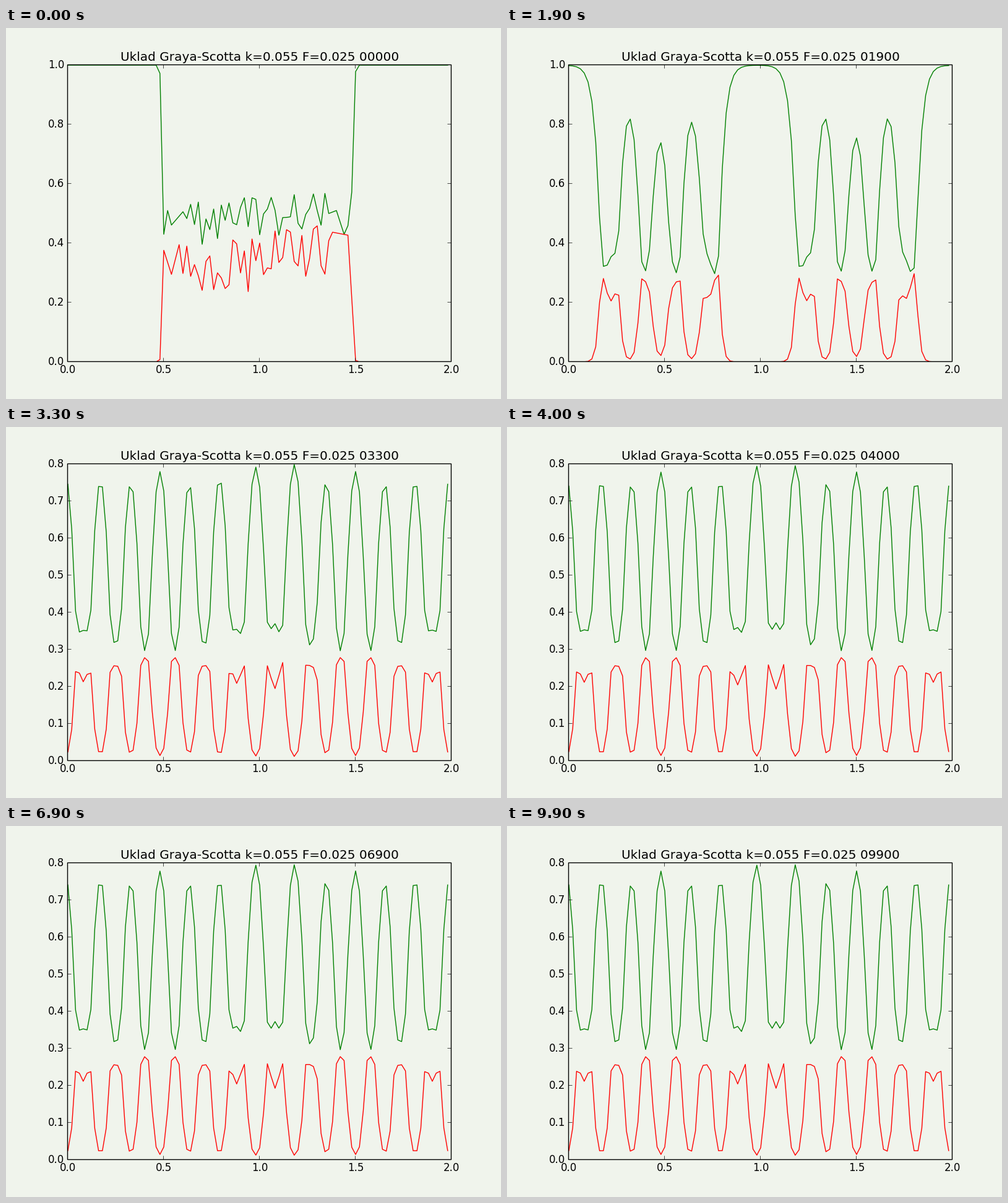
A matplotlib script for the animation above (10000 ms loop, 800x600 px).

```python
import numpy as np
import matplotlib.pyplot as plt
from matplotlib.animation import FuncAnimation
from matplotlib.collections import LineCollection
from matplotlib.patches import Rectangle
from matplotlib.transforms import ScaledTranslation

F, K = 0.025, 0.055
DU, DV = 2e-5, 1e-5
N, DX = 100, 0.02
FRAMES, STEPS = 100, 100
BG = "#f0f4ec"

# Key points (cell, value) of the starting block; noise fills its inside.
U_KEYS = [(23, 1), (24, .972), (25, .43), (26, .51), (27, .461), (30, .506),
          (32, .46), (68, .5), (70, .51), (72, .43), (73, .459), (74, .572),
          (75, .978), (76, 1)]
V_KEYS = [(23, 0), (24, .008), (25, .376), (27, .295), (29, .395), (30, .298),
          (31, .39), (32, .29), (67, .38), (69, .437), (73, .427), (74, .215),
          (75, .005), (76, 0)]


def laplacian(a):
    return (np.roll(a, 1) + np.roll(a, -1) - 2 * a) / DX**2


def start():
    cells = np.arange(N)
    u, v = (np.interp(cells, *zip(*keys)) for keys in (U_KEYS, V_KEYS))
    rng = np.random.default_rng(4)
    u[32:68] += rng.uniform(-0.08, 0.08, 36)
    v[32:68] += rng.uniform(-0.1, 0.1, 36)
    return u, v


def simulate():
    u, v = start()
    states = []
    for _ in range(FRAMES):
        states.append((u, v))
        for _ in range(STEPS):
            # v reacts with the already updated u
            u = u + DU * laplacian(u) - u * v**2 + F * (1 - u)
            v = v + DV * laplacian(v) + u * v**2 - (F + K) * v
    return states


states = simulate()
x = np.arange(N) * DX

plt.rcParams.update({"font.family": "DejaVu Sans", "font.size": 12,
                     "ytick.alignment": "center", "text.kerning_factor": 6})
fig = plt.figure(figsize=(8, 6), dpi=100, facecolor=BG)
ax = fig.add_axes([0.125, 0.1, 0.775, 0.8], facecolor=BG)
ax.set_xlim(0, 2)
xticks = np.linspace(0, 2, 5)
ax.set_xticks(xticks, [f"{t:.1f}" for t in xticks])
ax.tick_params(axis="x", length=0, pad=3)
ax.tick_params(axis="y", length=0, pad=4)
ax.spines[:].set_visible(False)

u_line, = ax.plot([], [], color="#008000", lw=1)
v_line, = ax.plot([], [], color="#ff0000", lw=1)
title = ax.set_title("", fontsize=14.4, pad=5)

# Frame and ticks sit on pixel centres.
half = ax.transAxes + ScaledTranslation(-0.005, 0.005, fig.dpi_scale_trans)
ax.add_patch(Rectangle((0, 0), 1, 1, fill=False, ec="black", lw=1, snap=False,
                       transform=half, clip_on=False, zorder=2.6))
marks = LineCollection([], colors="black", linewidths=0.5, transform=half,
                       clip_on=False, zorder=2.5)
marks.set_snap(False)
ax.add_collection(marks, autolim=False)


def tick_segments(fx, fy):
    dx, dy = 6 / 620, 6 / 480
    segs = []
    for a in fx:
        segs += [[(a, 0), (a, dy)], [(a, 1), (a, 1 - dy)]]
    for b in fy:
        segs += [[(0, b), (dx, b)], [(1, b), (1 - dx, b)]]
    return segs


def update(i):
    u, v = states[i]
    peak = u.max()
    step = 0.1 if peak <= 0.9 else 0.2
    count = int(np.ceil(peak / step - 1e-6))
    yticks = np.arange(count + 1) * step
    ax.set_ylim(0, count * step)
    ax.set_yticks(yticks, [f"{t:.1f}" for t in yticks])
    marks.set_segments(tick_segments(xticks[1:-1] / 2,
                                     np.arange(1, count) / count))
    u_line.set_data(x, u)
    v_line.set_data(x, v)
    title.set_text(f"Uklad Graya-Scotta k={K} F={F} {i * STEPS:05d}")
    return u_line, v_line, title, marks


anim = FuncAnimation(fig, update, frames=FRAMES, interval=100, repeat=True,
                     cache_frame_data=False)
plt.show()
```
